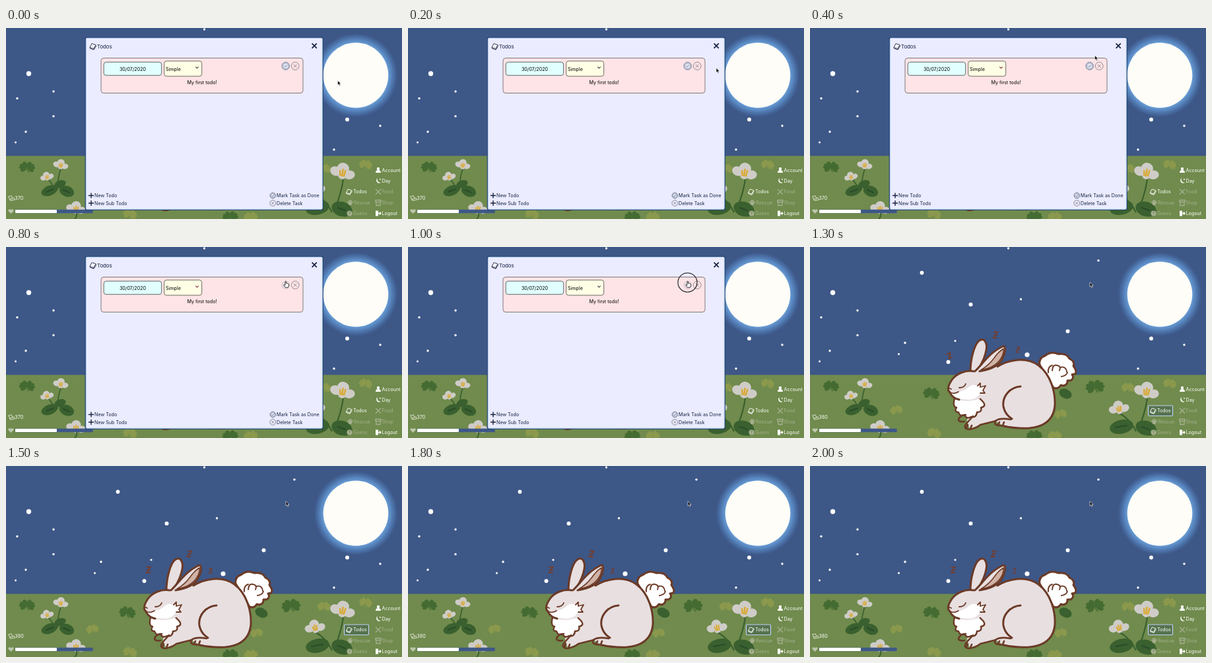
An HTML page that plays this animation: 600x289 px, repeating every 2100 ms.

```html
<!DOCTYPE html>
<html lang="en">
<head>
<meta charset="utf-8">
<title>Bunny todos</title>
<style>
html, body { margin: 0; width: 100%; height: 100%; overflow: hidden; background: #3d5787; }
svg { display: block; width: 600px; height: 289px; }
text { font: 7.15px Inter, "Open Sans", sans-serif; }
</style>
</head>
<body>
<svg id="stage" viewBox="0 0 600 289"></svg>
<script>
const stage = document.getElementById('stage');
const INK = '#6b3a27', FUR = '#e8dfe0', NAVY = '#17213f';
const LEAF = '#3a602f', CLOVER = '#446b32', OLIVE = '#8b994d', FADED = '#a5b08f';

const circle = (x, y, r, attrs) => `<circle cx="${x}" cy="${y}" r="${r}" ${attrs}/>`;
const oval = (x, y, rx, ry, turn = 0) =>
  `<ellipse cx="${x}" cy="${y}" rx="${rx}" ry="${ry}" transform="rotate(${turn} ${x} ${y})"/>`;
const path = (d, attrs = '') => `<path d="${d}" ${attrs}/>`;
const text = (x, y, label, attrs = '') => `<text x="${x}" y="${y}" ${attrs}>${label}</text>`;
const place = (x, y, scale, turn, body) =>
  `<g transform="translate(${x} ${y}) rotate(${turn}) scale(${scale})">${body}</g>`;

const STARS = [
  [34.5, 69, 3.7], [17, 106.5, 1.7], [72, 96, 1.7], [72, 133.5, 1.7], [30, 157, 1.7],
  [14.5, 173, 1.5], [169.5, 39, 2.9], [243.5, 87, 3], [319.5, 79, 1.7], [437, 20.5, 1.7],
  [390.5, 127.5, 3], [329, 163, 3.6], [144, 145, 1.8], [134.5, 162, 1.6], [209.5, 174, 3],
  [220, 142, 1.6], [517, 138.5, 3], [567, 148, 1.7], [497, 184, 1.7], [300.5, 2, 1.7]
];

function clover(x, y, size, turn, color) {
  const heart = 'M0 0C-3-3-7-6-5-10C-4-12-1-11 0-9.5C1-11 4-12 5-10C7-6 3-3 0 0Z';
  const leaves = [-115, -48, 40, 108].map(a => path(heart, `transform="rotate(${a})"`)).join('');
  return place(x, y, size, turn, `<g fill="${color}" transform="scale(1.05 .8)">${leaves}</g>` +
    path('M0 0Q0 4 3 7', `stroke="${color}" stroke-width="1.4" fill="none"`));
}

function bloom(x, y, size, turn) {
  return place(x, y, size, turn,
    `<g fill="#cfccc8">${oval(-8, 0, 6.2, 5.2, 15)}${oval(8, 2, 6.2, 5, -15)}${oval(0, -4, 6.8, 6.5)}${oval(0, 4, 4.5, 4)}</g>` +
    path('M-3-1L-2 4M0-3V4M3-2L2 4', 'stroke="#d9aa35" stroke-width="1.9" stroke-linecap="round"'));
}

const plants = `
  <g fill="none" stroke="${LEAF}" stroke-width="1.7">
    ${path('M83 213Q78 228 78 245M62 229Q68 231 74 244')}
    ${path('M511 229Q508 250 497 278M469 252Q484 259 494 279', 'stroke-width="2.2"')}
  </g>
  <g fill="${LEAF}">
    ${oval(66, 246, 13, 7.5, -22)}${oval(92, 247, 11.5, 8, 22)}${oval(82, 236, 9, 5.5, -20)}
    ${oval(472, 272, 18, 10.5, -12)}${oval(509, 274, 16, 11, 18)}${oval(387, 222, 10, 7, 25)}
  </g>
  ${path('M61 248L72 244M87 245L96 249M463 273L480 270M503 272L514 276', 'stroke="#294b2a" stroke-width="2" stroke-linecap="round"')}
  ${bloom(83, 207, .82, 6)}${bloom(62, 225, .72, -20)}${bloom(106, 273, 1.05, 5)}
  ${path('M107 280Q108 286 104 289', `stroke="${LEAF}" stroke-width="2" fill="none"`)}
  ${bloom(510, 218, 1.35, 8)}${bloom(468, 244, 1.1, -15)}`;

const scenery = `
  <defs><radialGradient id="glow">
    <stop offset=".75" stop-color="#6a9fd8"/><stop offset=".84" stop-color="#5b8bc6" stop-opacity=".8"/>
    <stop offset=".92" stop-color="#4e78b1" stop-opacity=".5"/>
    <stop offset="1" stop-color="#3d5787" stop-opacity="0"/>
  </radialGradient></defs>
  <rect width="600" height="289" fill="#3d5787"/>
  ${circle(530, 71.5, 65, 'fill="url(#glow)"')}
  ${circle(530, 71.5, 49.3, 'fill="#fefdf8"')}
  ${STARS.map(([x, y, r]) => circle(x, y, r, 'fill="#fff"')).join('')}
  <rect y="193.5" width="600" height="95.5" fill="#708b4d"/>
  ${clover(32, 211, 1, 5, CLOVER)}${clover(184, 222, 1.05, 10, CLOVER)}
  ${clover(432, 212, 1.2, -5, CLOVER)}${clover(340, 286, 1, 0, CLOVER)}
  ${clover(131, 247, .8, -10, OLIVE)}${clover(482, 213, .85, 5, OLIVE)}
  ${clover(545, 207, .85, 12, OLIVE)}${clover(188, 282, .9, 15, OLIVE)}
  ${clover(380, 253, .8, -10, OLIVE)}${clover(371, 286, .9, 0, OLIVE)}
  ${plants}`;

const rabbit = `
  <g stroke="${INK}" stroke-width="3" stroke-linejoin="round" stroke-linecap="round" fill="${FUR}">
    ${path('M348 178Q346 168 357 164Q366 157 376 162Q389 160 393 169Q402 173 399 180Q405 188 402 192L397 193Q401 198 395 202L390 202Q391 208 384 210L380 209Q376 216 369 213Z', 'fill="#fff"')}
    ${path('M361 190Q360 181 367 179M367 187Q368 177 374 179Q381 180 378 187M379 182Q388 180 389 189M381 196Q388 195 390 190', 'fill="none" stroke-width="1.9"')}
    ${path('M244 188L285 180C300 171 327 165 346 179C365 193 372 220 371 240C369 261 355 272 332 274Q312 275 294 271L282 264L258 269L242 275L238 264Z', 'stroke="none"')}
    ${path('M284 181C300 171 327 165 346 179C365 193 372 220 371 240C369 261 355 272 332 274Q312 275 294 271', 'fill="none"')}
    ${path('M218 234Q217 242 222 243Q218 250 225 250Q227 257 234 254Q237 261 244 257Q252 259 253 250Q261 250 259 243Q268 241 262 234L250 222L220 224Z', 'fill="#fff" stroke-width="2.4"')}
    ${path('M243 189C243 169 249 148 256 142C264 136 269 145 267 156C265 168 260 177 254 186')}
    ${path('M254 187C238 186 223 190 215 201C209 210 208 217 212 220C217 231 232 235 247 232Q262 231 266 217Q272 202 266 188Z', 'stroke="none"')}
    ${path('M212 220Q228 221 238 214Q246 206 253 210L258 206L258 212L266 210L262 217L265 221L258 221Q251 232 239 231Q221 231 212 220Z', 'fill="#fff" stroke="none"')}
    ${path('M248 188C236 186 222 191 215 201C209 210 208 217 212 220C215 227 221 230 226 231', 'fill="none"')}
    ${path('M254 210L258 206L258 212L266 210L262 217L265 221L258 221', 'fill="none" stroke-width="1.8"')}
    ${path('M250 188C262 177 271 160 293 150C298 151 295 163 291 170C285 181 270 186 257 188')}
    ${path('M259 186Q271 179 279 168Q285 159 293 154Q294 161 289 169Q280 183 259 186Z', 'fill="#d1b2a6" stroke-width="1.5"')}
    ${path('M226 213Q234 213 236 207M212 220Q219 223 225 219M210 213L214 215', 'fill="none" stroke-width="1.8"')}
    ${path('M236 254Q228 254 225 261Q225 265 234 264M247 256L237 267Q231 275 241 276Q251 275 258 269L282 263M239 269L237 274M245 270L243 275', 'fill="none" stroke-width="2.6"')}
    ${path('M319 211C303 212 291 226 293 241Q295 253 306 260', 'fill="none"')}
    ${path('M304 261Q288 258 281 263Q278 269 285 270L294 271M287 265L285 269M294 265L292 270', 'fill="none" stroke-width="2.6"')}
  </g>`;

const personIcon = circle(0, -2, 2.2, 'fill="#fff"') + path('M-4 4Q-4 0 0 0Q4 0 4 4Z', 'fill="#fff"');
const moonIcon = path('M-1-4A4 4 0 1 0 4 3A5 5 0 0 1-1-4Z', 'fill="#fff"') + circle(3, -2, .9, 'fill="#fff"');
const bookIcon = path('M-2-4L4-2L1 4L-5 2ZM-5 2Q-5 4-3 4L1 5.5L5-1', 'stroke-width="1" stroke-linejoin="round"');
const exitIcon = path('M-4-4H0V4H-4Z', 'fill="#fff"') + path('M-1 0H4M2-2L4 0L2 2', 'stroke="#fff" stroke-width="1.3" fill="none"');
const foodIcon = path('M-4-4L4 4M4-4L-4 4', `stroke="${FADED}" stroke-width="1.4"`);
const shopIcon = path('M-4-4H4V-1H-4ZM-3 0V4H3V0', `fill="none" stroke="${FADED}" stroke-width="1.4"`);
const pawIcon = circle(0, 1, 2.7, `fill="${FADED}"`) +
  [-3, -1, 1, 3].map(x => circle(x, Math.abs(x) - 4, 1.2, `fill="${FADED}"`)).join('');
const helpIcon = circle(0, 0, 4, `fill="${FADED}"`) + text(0, 2.4, '?', 'text-anchor="middle" fill="#60773f" style="font-size:6.5px"');

const item = (x, y, label, icon, active) =>
  place(x - 5.5, y - 2.5, 1, 0, icon) + text(x, y, label, `fill="${active ? '#fff' : FADED}"`);

const menu = `
  ${item(569.5, 217.5, 'Account', personIcon, 1)}${item(569.5, 233.5, 'Day', moonIcon, 1)}
  <rect id="focus" x="512.5" y="240" width="37" height="15.5" rx="1.5" fill="#55734e" stroke="#bfd0f5" stroke-width="1.2"/>
  <g stroke="#fff" fill="none">${place(520, 247.5, .9, 0, bookIcon)}</g>${text(526, 250.3, 'Todos', 'fill="#fff"')}
  ${item(569.5, 250.3, 'Food', foodIcon)}${item(527, 267, 'Rescue', pawIcon)}
  ${item(569.5, 267, 'Shop', shopIcon)}${item(526, 283, 'Guess', helpIcon)}
  ${item(569.5, 283, 'Logout', exitIcon, 1)}
  ${path('M3.5 255L8 254L10 258L6 259ZM5 259L7 261L13 260L12 257L9 257', 'fill="none" stroke="#c8d0b5" stroke-width="1.2"')}
  <text id="coins" x="13.3" y="260" fill="#fff"></text>
  ${path('M7.5 281L3.5 277Q3 273 7.5 275Q12 273 11.5 277Z', 'fill="#bdc6ac"')}
  <rect x="14" y="275" width="117.5" height="5" rx="1" fill="#3d5787" stroke="#4b638b" stroke-width=".6"/>
  <rect x="14" y="275" width="63" height="5" rx="1" fill="#fff"/>`;

const cross = (x, y, r, attrs) => path(`M${x - r} ${y - r}l${2 * r} ${2 * r}m0 ${-2 * r}l${-2 * r} ${2 * r}`, attrs);
const deleteIcon = (x, y, r) => circle(x, y, r, 'fill="none" stroke="#77717f" stroke-width=".8"') +
  cross(x, y, r * .4, 'stroke="#77717f" stroke-width=".8"');
const doneIcon = (x, y, r) => circle(x, y, r, 'fill="#cdd3e4" stroke="#6f7890" stroke-width=".9"') +
  circle(x, y, r * .7, 'fill="#e0e3f1" stroke="#8d96ae" stroke-width=".6"') +
  path(`M${x - 2} ${y}l1.5 1.6l2.6-3.2`, 'fill="none" stroke="#6f7890" stroke-width=".8"');
const plusIcon = y => path(`M125 ${y}H133M129 ${y - 4}V${y + 4}`, `stroke="${NAVY}" stroke-width="1.4"`);

const dialog = `<g id="dialog">
  <rect x="120.5" y="14.5" width="359.5" height="260.5" rx="2" fill="#ebecff" stroke="#24406c" stroke-width="1.6"/>
  <rect x="121.3" y="15.3" width="357.9" height="258.9" rx="1.5" fill="none" stroke="#b7d7f7" stroke-width="1"/>
  <g stroke="#343b50" fill="#f7f7ff">${place(132, 27.5, 1, 0, bookIcon)}</g>
  ${text(138, 30.8, 'Todos', `fill="${NAVY}" style="font-size:7.8px"`)}
  ${cross(467.2, 27, 3.6, `stroke="${NAVY}" stroke-width="1.7"`)}
  <rect x="144" y="45.5" width="306" height="53" rx="4" fill="#fee4e6" stroke="#766b70" stroke-width=".9"/>
  <rect x="148.2" y="51.7" width="87.5" height="20" rx="3.5" fill="#e1fffe" stroke="#4b5d62" stroke-width=".9"/>
  ${text(192, 64.8, '30/07/2020', 'text-anchor="middle"')}
  <rect x="239.7" y="50" width="57" height="23" rx="3.5" fill="#ffffe5" stroke="#5f5c55" stroke-width=".9"/>
  ${text(242, 64.5, 'Simple')}
  <path id="chevron" d="M287.3 58.7L289.5 61L291.7 58.7" fill="none" stroke-width="1.1"/>
  ${text(297, 84.6, 'My first todo!', 'text-anchor="middle"')}
  <g id="done">${doneIcon(423.7, 57.5, 5.8)}</g>${deleteIcon(438.2, 57.5, 5.9)}
  <g fill="${NAVY}">${plusIcon(253.5)}${plusIcon(265)}
    ${text(134, 256, 'New Todo')}${text(134, 267.5, 'New Sub Todo')}
    ${text(410, 256, 'Mark Task as Done')}${text(410, 267.5, 'Delete Task')}</g>
  ${doneIcon(404.3, 253.5, 4.3)}${deleteIcon(404.3, 265, 4.4)}
</g>`;

const zs = [0, 1, 2].map(i =>
  `<path id="z${i}" d="M-4-4H4L-4 4H4M-3 0H3" fill="none" stroke="#753d2c" stroke-width="1.7" stroke-linejoin="round"/>`).join('');

const pointers = `
  <circle id="ring" cx="423.5" cy="53.7" fill="none" stroke="#17171b" stroke-width="1.1"/>
  <path id="arrow" d="M0 0V7L1.7 5.5L2.9 8L4.1 7.5L3 5H5.2Z" fill="#111" stroke="#fff" stroke-width=".6"/>
  <path id="hand" d="M-1.5 0V-4.5Q-.7-5.6 0-4.5V-1.8Q2-2.6 4-.5V2L2.8 4.4H-1.2L-3.8.8Q-3-.8-1.5 1Z" fill="#fff" stroke="#222" stroke-width=".9"/>`;

stage.innerHTML = scenery + rabbit + zs + menu + dialog + pointers;

const part = id => document.getElementById(id);
const show = (id, on) => part(id).setAttribute('visibility', on ? 'visible' : 'hidden');
const set = (id, name, value) => part(id).setAttribute(name, value);

// Keys are [time, ...values]; values ease between neighbouring keys.
function track(keys, t) {
  const next = keys.findIndex(k => k[0] > t);
  if (next < 0) return keys[keys.length - 1].slice(1);
  if (next === 0) return keys[0].slice(1);
  const a = keys[next - 1], b = keys[next];
  const u = (t - a[0]) / (b[0] - a[0]), e = u * u * (3 - 2 * u);
  return a.slice(1).map((v, i) => v + (b[i + 1] - v) * e);
}

const POINTER = [[0, 502.5, 79.5], [400, 431.5, 41.5], [700, 424, 53.3]];
// x, y, turn, horizontal scale, vertical scale
const SLEEP = [
  [[1100, 284, 133, 0, .8, 1.1], [1500, 278, 133, 8, .8, 1.1], [2000, 278, 133, 5, .8, 1.1]],
  [[1100, 320, 152.5, 5, .75, .9], [1500, 310, 158.5, 0, .6, .9], [2000, 310, 158.5, 0, .4, .9]],
  [[1100, 207, 172, -55, .75, .9], [1500, 216, 157, 0, .85, 1.05], [2000, 217, 157, 0, .8, 1.05]]
];

function draw(ms) {
  const t = Math.floor(ms % 2100 / 100) * 100;
  const open = t < 1100, hover = t >= 600 && open;
  const [x, y] = track(POINTER, t);
  show('dialog', open);
  show('focus', !open);
  show('arrow', !hover);
  show('hand', hover);
  show('ring', t === 900 || t === 1000);
  set('ring', 'r', t === 900 ? 9 : 14.5);
  set('arrow', 'transform', `translate(${x} ${y})`);
  set('hand', 'transform', `translate(${x + .5} ${y + 3.5})`);
  set('done', 'opacity', hover ? .35 : 1);
  set('chevron', 'stroke', t >= 300 && t < 900 ? '#8b3443' : '#444');
  part('coins').textContent = t < 1300 ? '370' : '380';
  SLEEP.forEach((keys, i) => {
    const [zx, zy, turn, sx, sy] = track(keys, t);
    set('z' + i, 'transform', `translate(${zx} ${zy}) rotate(${turn}) scale(${sx} ${sy})`);
  });
}

const start = performance.now();
function tick() {
  draw(performance.now() - start);
  requestAnimationFrame(tick);
}
tick();
</script>
</body>
</html>
```
